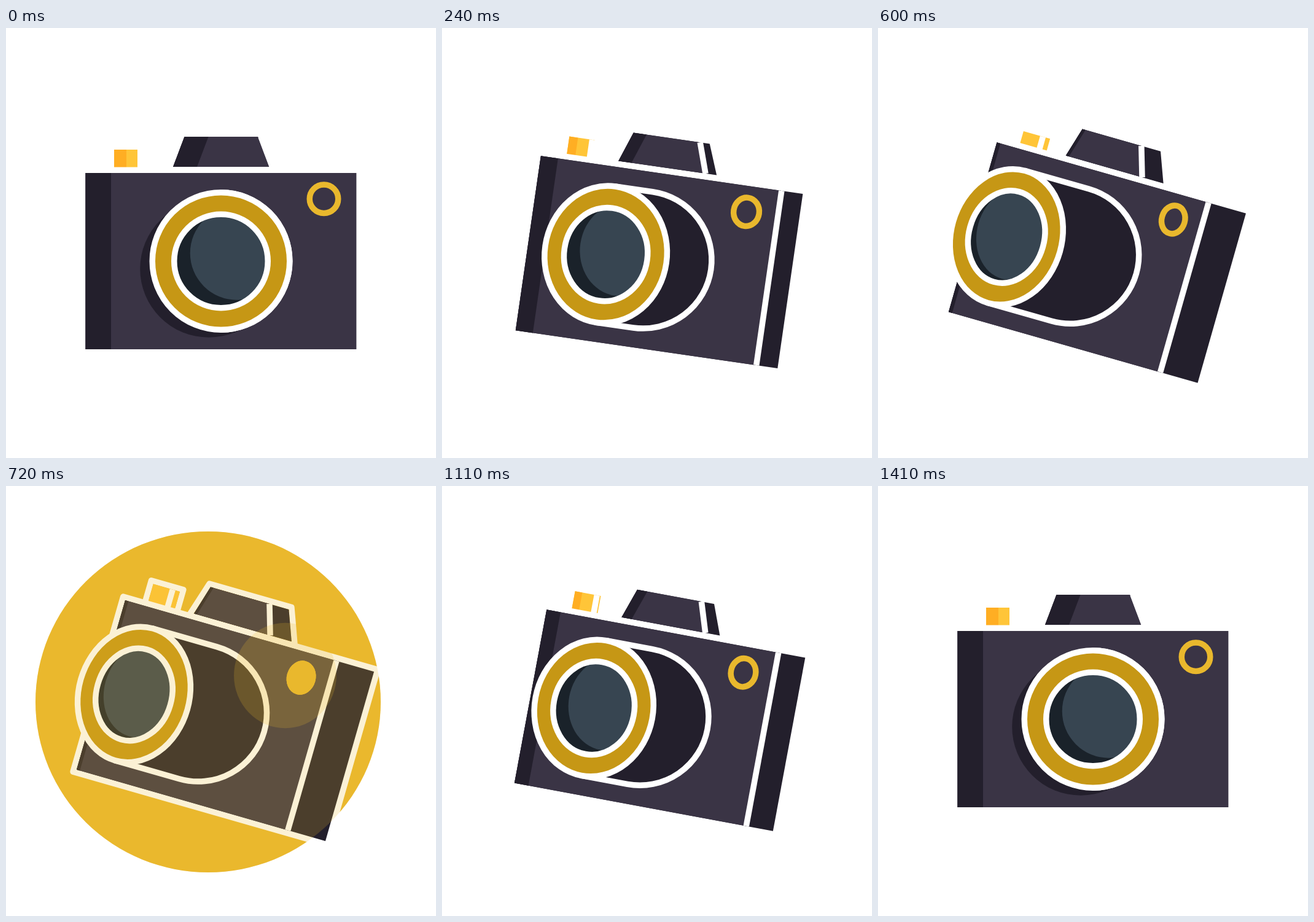
These frames come from a looping animation (700x700 px, 3.47 s). An HTML page with a canvas:

```html
<!DOCTYPE html>
<html lang="en">
<head>
<meta charset="utf-8">
<title>Camera</title>
<style>
  html, body { margin: 0; width: 100%; height: 100%; overflow: hidden; background: #fff; }
  canvas { display: block; width: 100vmin; height: 100vmin; }
</style>
</head>
<body>
<canvas id="stage"></canvas>
<script>
const LOOP = 3470, STEP = 30, LINE = 9.5, HALF = LINE / 2;
const FACE = '#3a3445', DARK = '#231f2c', WHITE = '#fff', GOLD = '#c69715',
      YELLOW = '#e9b82d', GLASS = '#374551', DEEP = '#1a222a',
      AMBER = '#ffae23', LIGHT = '#ffc538';

const canvas = document.getElementById('stage');
const ctx = canvas.getContext('2d');
const scale = window.devicePixelRatio || 1;
canvas.width = canvas.height = 700 * scale;

const clamp = v => Math.min(1, Math.max(0, v));
const curve = (a, b, c = 0) => p => a + b * p + c * p * p;

function ease(x) {
  if (x <= 0 || x >= 1) return clamp(x);
  let lo = 0, hi = 1;
  for (let i = 0; i < 30; i++) {
    const s = (lo + hi) / 2, r = 1 - s;
    if (3 * .234 * s * r * r + 3 * .38 * s * s * r + s * s * s < x) lo = s; else hi = s;
  }
  return lo * lo * (3 - 2 * lo);
}

// how each measure changes as the camera turns from 0 to 1
const turn = {
  cx: curve(350, 7), cy: curve(379.5, 4, -1.5),
  width: curve(441, -19.6), edge: curve(445.75, -106, 18),
  backX: curve(0, -58, 12), lensX: curve(0, -188, 33.5),
  lensR: curve(111.75, -26, 4.4), glassR: curve(76.25, -17.5, 2.6),
  flashX: curve(167.5, -83, 15), flashR: curve(23.25, -5, .6),
  buttonEdge: curve(-131.25, -10), buttonRight: curve(-136, 7),
  topL: curve(-59.5, -23.5), topR: curve(60, -14, 3.5),
  botL: curve(-78, -25, 6), botR: curve(78.5, -14, 3.7),
  topEdge: curve(65, -57, 8.8), botEdge: curve(83.5, -63.5, 12)
};

function paint(fill, stroke) {
  if (fill) { ctx.fillStyle = fill; ctx.fill(); }
  if (stroke) { ctx.strokeStyle = stroke; ctx.stroke(); }
}
function poly(points, fill, stroke) {
  ctx.beginPath();
  points.forEach(([x, y]) => ctx.lineTo(x, y));
  ctx.closePath();
  paint(fill, stroke);
}
function box(l, t, r, b, fill, stroke) {
  if (r > l) poly([[l, t], [r, t], [r, b], [l, b]], fill, stroke);
}
function oval(x, y, rx, ry, fill, stroke) {
  ctx.beginPath();
  ctx.ellipse(x, y, rx, ry, 0, 0, Math.PI * 2);
  paint(fill, stroke);
}
function line(x1, y1, x2, y2) {
  ctx.beginPath();
  ctx.moveTo(x1, y1);
  ctx.lineTo(x2, y2);
  paint(null, WHITE);
}

function button(m, p, press) {
  const l = -174, t = -181.5 + press, b = -150;
  const strip = 20 - 11 * p - 11 * p ** 6;
  box(l - HALF, t - HALF, m.buttonRight + HALF, b, null, WHITE);
  box(l, t, m.buttonRight, b, LIGHT);
  box(l, t, l + strip, b, AMBER);
  line(m.buttonEdge, t, m.buttonEdge, b);
}

function prism(m, p) {
  const t = -202.5, b = -153.5, strip = 39 - 34 * p;
  const te = Math.min(m.topEdge, m.topR), be = Math.min(m.botEdge, m.botR);
  poly([[m.topL - 3.3, t - HALF], [m.topR + 3.3, t - HALF],
        [m.botR + 6.9, b + HALF], [m.botL - 6.9, b + HALF]], null, WHITE);
  poly([[m.topL, t], [m.topR, t], [m.botR, b], [m.botL, b]], DARK);
  poly([[m.topL, t], [te, t], [be, b], [m.botL, b]], FACE);
  poly([[m.topL, t], [m.topL + strip, t], [m.botL + strip, b], [m.botL, b]], DARK);
  line(m.topEdge, t, m.botEdge, b);
}

function body(m, p) {
  const r = m.width / 2, l = -r, h = 143.5, edge = l + m.edge;
  const strip = 41.5 - 22 * p - 14 * p ** 3;
  box(l - HALF, -h - HALF, r + HALF, h + HALF, WHITE, WHITE);
  box(l, -h, r, h, DARK);
  box(l, -h, Math.min(edge, r), h, FACE);
  box(l, -h, l + strip, h, DARK);
  line(edge, -h, edge, h);
}

function lens(m, p) {
  const R = 111.75, shade = clamp(1 - 2 * p);
  oval(m.backX - 20 * shade, 12.5 * shade, R, R, DARK);

  ctx.beginPath();
  ctx.moveTo(m.lensX, -R);
  ctx.lineTo(m.backX, -R);
  ctx.arc(m.backX, 0, R, -Math.PI / 2, Math.PI / 2);
  ctx.lineTo(m.lensX, R);
  ctx.closePath();
  paint(DARK, WHITE);

  oval(m.lensX, 0, m.lensR, R, GOLD, WHITE);
  oval(m.lensX, 0, m.glassR, 76.25, DEEP);
  ctx.save();
  ctx.clip();
  oval(m.lensX + 26 - 2 * p - 13 * p ** 5, -13 + 4.5 * p * p, m.glassR, 76.25, GLASS);
  ctx.restore();
  oval(m.lensX, 0, m.glassR, 76.25, null, WHITE);
}

function glow(x, y, rx, ry, size, alpha) {
  const mix = (a, b) => a + (b - a) * size;
  ctx.globalAlpha = alpha;
  oval(mix(481, x), mix(312, y), mix(23, rx), mix(26, ry), YELLOW);
  ctx.globalAlpha = 1;
}

function draw(t) {
  const p = t < 705 ? ease(t / 660) : ease((1410 - t) / 660);
  const press = 9 * Math.sin(Math.PI * clamp((t - 540) / 150));
  const grow = clamp((t - 630) / 90);
  const lit = t > 630 ? clamp((840 - t) / 90) : 0;
  const m = {};
  for (const key in turn) m[key] = turn[key](p);

  ctx.setTransform(scale, 0, 0, scale, 0, 0);
  ctx.fillStyle = WHITE;
  ctx.fillRect(0, 0, 700, 700);
  ctx.lineWidth = LINE;
  ctx.lineJoin = 'round';

  if (lit) glow(329, 351.5, 281, 277.5, grow, lit);

  ctx.save();
  ctx.translate(m.cx, m.cy);
  ctx.rotate(16 * p * Math.PI / 180);
  button(m, p, press);
  prism(m, p);
  body(m, p);
  lens(m, p);
  oval(m.flashX, -101.3, m.flashR, 23.25, null, YELLOW);
  ctx.restore();

  if (lit) {
    glow(329, 351.5, 281, 277.5, grow, .2 * lit);
    glow(454.5, 308.5, 83.5, 85.7, grow, .2 * lit);
    ctx.save();
    ctx.translate(m.cx, m.cy);
    ctx.rotate(16 * p * Math.PI / 180);
    ctx.globalAlpha = lit;
    oval(m.flashX, -101.3, m.flashR + HALF, 28, YELLOW);
    ctx.restore();
  }
}

const start = performance.now();
function tick() {
  const t = (performance.now() - start) % LOOP;
  draw(Math.floor(t / STEP) * STEP);
  requestAnimationFrame(tick);
}
tick();
</script>
</body>
</html>
```
